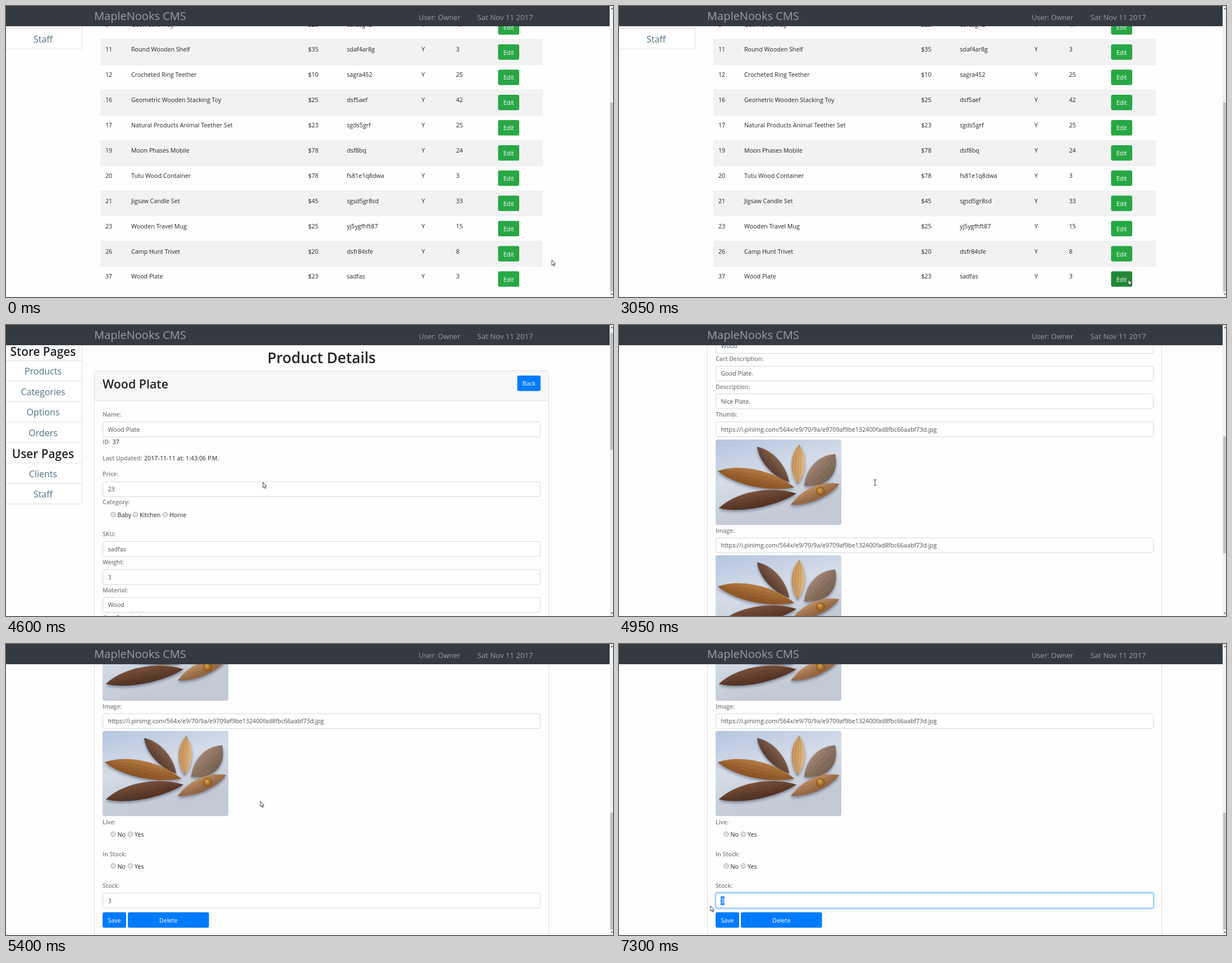
Write an HTML page with a canvas that moves like this. It is 1081 by 518 pixels and loops after 8 s.

```html
<!DOCTYPE html>
<html lang="en">
<head>
<meta charset="utf-8">
<title>Product editor</title>
<style>
  html, body { margin: 0; width: 100%; height: 100%; overflow: hidden; background: #fefefe; }
  canvas { display: block; }
</style>
</head>
<body>
<canvas id="stage" width="1081" height="518"></canvas>
<script>
const ctx = document.getElementById('stage').getContext('2d');
const LOOP = 8000, OPEN_PAGE = 3605, FOCUS = 6440;
const INK = '#212529', BLUE = '#007bff', LINE = '#dfdfdf';

// Bursts of screen updates: start, end, number of steps
const BURSTS = [
  [0, 0, 1], [440, 1210, 11], [1280, 1590, 5], [1760, 1760, 1], [1990, 2370, 6],
  [2510, 2600, 2], [2760, 3050, 5], [3280, 3360, 2], [3530, 3690, 3], [3830, 3910, 2],
  [4140, 4600, 7], [4710, 4860, 3], [4950, 5400, 7], [5530, 5700, 3], [5760, 5920, 3],
  [6070, 6840, 11], [6920, 7000, 2], [7150, 7300, 3]
];

// Pointer path: time, x, y
const POINTER = [
  [0, 972, 452], [363, 972, 452], [590, 930, 428], [900, 769, 470], [1060, 780, 485],
  [1210, 825, 485], [1280, 815, 485], [1430, 786, 474], [1590, 801, 464], [1910, 801, 464],
  [2140, 862, 497], [2370, 905, 490], [2510, 936, 496], [2600, 942, 480], [2760, 930, 473],
  [2900, 900, 480], [3050, 907, 487], [3360, 904, 487], [3830, 905, 484], [3910, 904, 487],
  [4063, 904, 487], [4300, 680, 350], [4523, 458, 280], [4950, 456, 280], [5400, 453, 280],
  [5530, 400, 350], [5700, 313, 437], [5920, 298, 439], [6300, 230, 453], [6460, 205, 458],
  [6610, 192, 459], [6840, 171, 464], [7000, 151, 465], [7150, 155, 465], [7300, 163, 466]
];

const SCROLL = [
  [4523, -13], [4600, 0], [4710, 140], [4860, 370], [4950, 461], [5175, 650], [5325, 716]
];

const ROWS = [
  [9, 'Geometric Tray', 25, 'dsfdsg42', 47],
  [11, 'Round Wooden Shelf', 35, 'sdaf4ar8g', 3],
  [12, 'Crocheted Ring Teether', 10, 'sagra452', 25],
  [16, 'Geometric Wooden Stacking Toy', 25, 'dsf5aef', 42],
  [17, 'Natural Products Animal Teether Set', 23, 'sgds5grf', 25],
  [19, 'Moon Phases Mobile', 78, 'dsf8bq', 24],
  [20, 'Tutu Wood Container', 78, 'fs81e1q8dwa', 3],
  [21, 'Jigsaw Candle Set', 45, 'sgsd5gr8sd', 33],
  [23, 'Wooden Travel Mug', 25, 'yj5ygfhft87', 15],
  [26, 'Camp Hunt Trivet', 20, 'dsfr84sfe', 8],
  [37, 'Wood Plate', 23, 'sadfas', 3]
];

const PHOTO_URL = 'https://i.pinimg.com/564x/e9/70/9a/e9709af9be132400fad8fbc66aabf73d.jpg';

// Label baseline, label, field top, value
const FIELDS = [
  [163, 'Name:', 172.5, 'Wood Plate'], [269, 'Price:', 279, '23'], [376, 'SKU:', 385.5, 'sadfas'],
  [426, 'Weight:', 435.5, '3'], [475.5, 'Material:', 485, 'Wood'],
  [524.5, 'Cart Description:', 534, 'Good Plate.'], [574.5, 'Description:', 583.5, 'Nice Plate.'],
  [624, 'Thumb:', 633.5, PHOTO_URL], [830.5, 'Image:', 840, PHOTO_URL]
];

function held(t) {
  const [start, end, steps] = BURSTS.filter(b => b[0] <= t).pop();
  if (steps === 1) return start;
  const step = (end - start) / (steps - 1);
  return start + Math.min(steps - 1, Math.floor((t - start + 3) / step)) * step;
}

function track(keys, t, col) {
  const i = keys.findIndex(k => k[0] > t);
  if (i === 0) return keys[0][col];
  if (i < 0) return keys[keys.length - 1][col];
  const a = keys[i - 1], b = keys[i];
  return a[col] + (b[col] - a[col]) * (t - a[0]) / (b[0] - a[0]);
}

function text(str, x, y, { size = 10.7, color = INK, weight = 400, align = 'left' } = {}) {
  ctx.font = `${weight} ${size}px "Open Sans", "Noto Sans", sans-serif`;
  ctx.fillStyle = color;
  ctx.textAlign = align;
  ctx.fillText(str, x, y);
}

function rect(x, y, w, h, color) {
  ctx.fillStyle = color;
  ctx.fillRect(x, y, w, h);
}

function box(x, y, w, h, { r = 3, fill, stroke, width = 1 }) {
  ctx.beginPath();
  ctx.roundRect(x, y, w, h, r);
  if (fill) { ctx.fillStyle = fill; ctx.fill(); }
  if (stroke) { ctx.strokeStyle = stroke; ctx.lineWidth = width; ctx.stroke(); }
}

function button(label, x, y, w, fill) {
  box(x, y, w, 27.5, { fill });
  text(label, x + w / 2, y + 18.3, { color: '#fff', align: 'center' });
}

const label = (str, y) => text(str, 172, y, { size: 10.5, weight: 600, color: '#7f8183' });

function field(y, value) {
  box(172.5, y, 779, 26.5, { fill: '#fff', stroke: '#d3d8dd' });
  text(value, 181.5, y + 17.3, { color: '#495057' });
}

function radios(y, items) {
  for (const [x, str] of items) {
    ctx.beginPath();
    ctx.arc(x, y, 4.2, 0, 7);
    ctx.fillStyle = '#e4e4e4';
    ctx.fill();
    ctx.strokeStyle = '#a2a2a2';
    ctx.lineWidth = 1;
    ctx.stroke();
    text(str, x + 7.5, y + 4.5);
  }
}

// A pointed leaf between two tips, bulging by a and b on either side
function leaf(x0, y0, x1, y1, a, b, light, dark) {
  const dx = x1 - x0, dy = y1 - y0, len = Math.hypot(dx, dy);
  const nx = -dy / len, ny = dx / len;
  const at = (k, n) => [x0 + dx * k + nx * n, y0 + dy * k + ny * n];
  const fill = ctx.createLinearGradient(...at(.5, a * .75), ...at(.5, -b * .75));
  fill.addColorStop(0, light);
  fill.addColorStop(1, dark);
  ctx.beginPath();
  ctx.moveTo(x0, y0);
  ctx.bezierCurveTo(...at(.25, a), ...at(.7, a), x1, y1);
  ctx.bezierCurveTo(...at(.7, -b), ...at(.25, -b), x0, y0);
  ctx.shadowColor = 'rgba(50,55,75,.5)';
  ctx.shadowBlur = 5;
  ctx.shadowOffsetY = 3;
  ctx.fillStyle = fill;
  ctx.fill();
  ctx.shadowColor = 'transparent';
  ctx.strokeStyle = 'rgba(60,35,20,.25)';
  ctx.lineWidth = .7;
  for (const n of [-.4, 0, .4]) {
    const bulge = n < 0 ? b * n : a * n;
    ctx.beginPath();
    ctx.moveTo(x0, y0);
    ctx.bezierCurveTo(...at(.25, bulge), ...at(.7, bulge), x1, y1);
    ctx.stroke();
  }
}

function photo(y) {
  ctx.save();
  ctx.translate(172, y);
  ctx.beginPath();
  ctx.roundRect(0, 0, 224, 152, 4);
  ctx.clip();
  const cloth = ctx.createLinearGradient(0, 0, 40, 152);
  cloth.addColorStop(0, '#b4c5de');
  cloth.addColorStop(.5, '#d5dce8');
  cloth.addColorStop(1, '#c3cad6');
  rect(0, 0, 224, 152, cloth);
  leaf(74, 13, 131, 76, 15, 17, '#5a3c30', '#80604c');
  leaf(149, 9, 146, 79, 16, 15, '#c58f56', '#e0b983');
  leaf(213, 26, 158, 82, 20, 31, '#a08472', '#75604f');
  leaf(4, 56, 140, 85, 18, 22, '#885022', '#b47a40');
  leaf(6, 122, 144, 96, 16, 23, '#4e3023', '#79503a');
  leaf(220, 79, 134, 116, 18, 14, '#bd8d62', '#8d6242');
  ctx.beginPath();
  ctx.arc(187, 92, 8, 0, 7);
  const ball = ctx.createRadialGradient(185, 89, 1, 187, 92, 8);
  ball.addColorStop(0, '#d5a04c');
  ball.addColorStop(1, '#875016');
  ctx.fillStyle = ball;
  ctx.fill();
  ctx.restore();
}

function listPage(px, py) {
  box(-6, 2.5, 141.5, 74, { fill: '#fff', stroke: LINE });
  rect(0, 39.5, 135, 1, LINE);
  text('Staff', 66, 65, { size: 16, color: '#4d7380', align: 'center' });
  ROWS.forEach(([id, name, price, sku, stock], i) => {
    const y = 14.4 + 44.88 * i, base = y + 22.2;
    rect(168, Math.round(y), 788, 45, i % 2 ? '#f2f2f2' : '#fefefe');
    rect(168, Math.round(y), 788, 1, '#e9ecef');
    [[177, id], [223, name], [538, '$' + price], [607, sku], [740, 'Y'], [801.5, stock]]
      .forEach(([x, str]) => text(str, x, base));
    const hover = px >= 876 && px <= 914 && py >= y + 9 && py <= y + 36.5;
    button('Edit', 876.3, y + 9, 37.7, hover ? '#218838' : '#28a745');
  });
}

function sidebar() {
  box(-6, 0, 141.5, 318.5, { fill: '#fff', stroke: LINE });
  ['Store Pages', 'Products', 'Categories', 'Options', 'Orders', 'User Pages', 'Clients', 'Staff']
    .forEach((str, i) => {
      const y = 26.5 + 36.55 * i;
      const heading = str.endsWith('Pages');
      if (i) rect(0, Math.round(y - .4), 135, 1, LINE);
      text(str, 66, y + (heading ? 28 : 25), heading
        ? { size: 20.8, weight: 600, align: 'center' }
        : { size: 16, color: '#4d7380', align: 'center' });
    });
}

function detailsPage(t, scroll) {
  ctx.save();
  ctx.translate(0, -scroll);
  sidebar();
  text('Product Details', 562, 67.5, { size: 26.2, weight: 600, align: 'center' });
  box(157.5, 81.5, 809, 1200, { fill: '#fefefe', stroke: LINE });
  box(158, 82, 808, 53, { r: [3, 3, 0, 0], fill: '#f7f7f7' });
  rect(158, 134.5, 808, 1, LINE);
  text('Wood Plate', 172, 112.5, { size: 21.4, weight: 600 });
  button('Back', 910.5, 90, 41.5, BLUE);

  for (const [base, name, top, value] of FIELDS) {
    label(name, base);
    field(top, value);
  }
  label('ID:', 212);
  text('37', 189.5, 212);
  label('Last Updated:', 241);
  text('2017-11-11 at: 1:43:06 P.M.', 246, 241);
  label('Category:', 319);
  radios(337.5, [[191, 'Baby'], [230.5, 'Kitchen'], [283.5, 'Home']]);
  photo(665);
  photo(870.5);
  label('Live:', 1036.5);
  radios(1054.5, [[191, 'No'], [221.5, 'Yes']]);
  label('In Stock:', 1093.5);
  radios(1111, [[191, 'No'], [221.5, 'Yes']]);
  label('Stock:', 1150);
  field(1159.5, '3');
  if (t >= FOCUS) {
    box(171.3, 1158.3, 781.4, 28.9, { stroke: '#bfdeff', width: 2.6, r: 4 });
    box(172.5, 1159.5, 779, 26.5, { stroke: '#80bdff' });
    if (track(POINTER, t, 1) < 185) {
      rect(181, 1165, 6.7, 16, '#3390ff');
      text('3', 181.5, 1176.8, { color: '#fff' });
    }
  }
  button('Save', 172, 1193.5, 42, BLUE);
  button('Delete', 217, 1193.5, 144.5, BLUE);
  ctx.restore();
}

function header() {
  rect(0, 0, 1075, 36, '#343a40');
  const color = '#9b9fa2';
  text('MapleNooks CMS', 157, 25, { size: 20, color });
  text('User: Owner', 735, 25, { size: 12.7, color });
  text('Sat Nov 11 2017', 839.5, 25, { size: 13.2, color });
}

function triangle(x, y, h) {
  ctx.beginPath();
  ctx.moveTo(x - 2, y);
  ctx.lineTo(x + 2, y);
  ctx.lineTo(x, y + h);
  ctx.fillStyle = '#505050';
  ctx.fill();
}

function scrollbar(top, height) {
  rect(1075, 0, 6, 518, '#f1f1f1');
  rect(1076, top, 5, height, '#c1c1c1');
  triangle(1079, 5.5, -2.5);
  triangle(1079, 512, 2.5);
}

function arrow(x, y) {
  ctx.beginPath();
  [[0, 0], [0, 9.6], [2.2, 7.7], [3.7, 11], [5.2, 10.3], [3.8, 7.1], [6.6, 7]]
    .forEach(([dx, dy]) => ctx.lineTo(x + dx, y + dy));
  ctx.closePath();
  ctx.fillStyle = '#fff';
  ctx.fill();
  ctx.strokeStyle = '#2b2b2b';
  ctx.lineWidth = .9;
  ctx.stroke();
}

function beam(x, y) {
  rect(x - .5, y - 4.5, 1, 10, '#333');
  rect(x - 2.5, y - 5, 5, 1, '#555');
  rect(x - 2.5, y + 5, 5, 1, '#555');
}

function draw(now) {
  const t = held(now % LOOP);
  const x = track(POINTER, t, 1), y = track(POINTER, t, 2);
  rect(0, 0, 1081, 518, '#fefefe');
  if (t < OPEN_PAGE) {
    listPage(x, y);
    scrollbar(172, 336);
  } else {
    const scroll = track(SCROLL, t, 1);
    detailsPage(t, scroll);
    scrollbar(14 + scroll / 2.5, 208);
  }
  header();
  const overText = (t > 4700 && t < 5240) || (t > 6065 && t < 6830);
  (overText ? beam : arrow)(x, y);
}

const begin = performance.now();
function tick() {
  draw(performance.now() - begin);
  requestAnimationFrame(tick);
}
tick();
</script>
</body>
</html>
```
